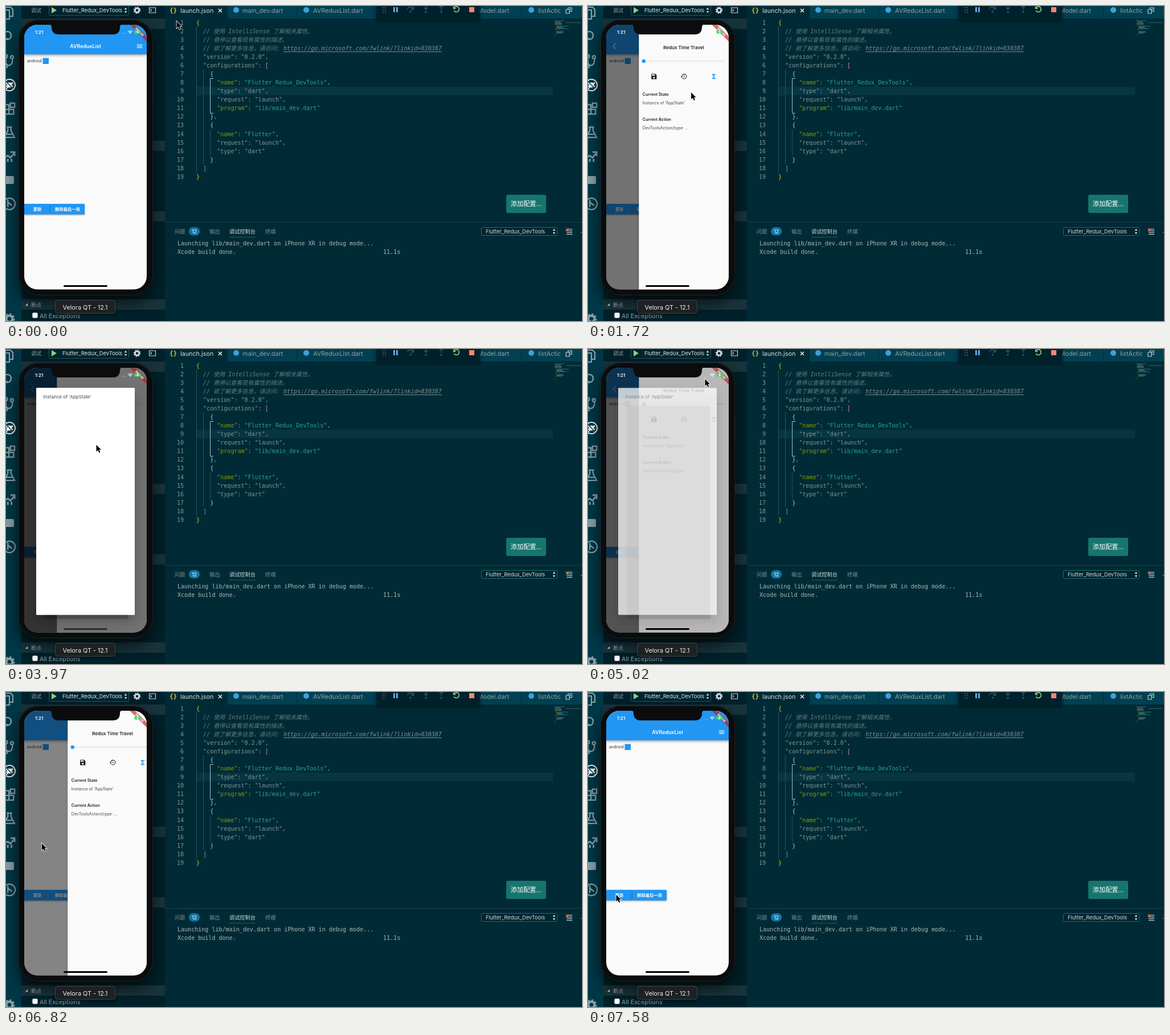
These frames come from a looping animation (1011 by 554 pixels, 8000 ms). An HTML page with a canvas:

```html
<!DOCTYPE html>
<html lang="zh">
<head>
<meta charset="utf-8">
<title>Redux DevTools</title>
<style>
  html, body { margin: 0; width: 100%; height: 100%; overflow: hidden; background: #002b36; }
  canvas { display: block; }
</style>
</head>
<body>
<canvas id="stage" width="1011" height="554"></canvas>
<script>
const c = document.getElementById('stage').getContext('2d');
const UI = 'Inter, "Noto Sans CJK SC", sans-serif';
const MONO = '"DejaVu Sans Mono", "Noto Sans CJK SC", monospace';
const GREY = '#839496', BLUE = '#2196f3', TEAL = '#2aa198', GREEN = '#859900', NOTE = '#657b83';

// ---- helpers ----
function box(x, y, w, h, fill, r = 0, stroke) {
  c.beginPath();
  c.roundRect(x, y, w, h, r);
  if (fill) { c.fillStyle = fill; c.fill(); }
  if (stroke) { c.strokeStyle = stroke; c.lineWidth = 1; c.stroke(); }
}
function dot(x, y, r, fill) {
  c.beginPath();
  c.arc(x, y, r, 0, 7);
  c.fillStyle = fill;
  c.fill();
}
function text(s, x, y, size, fill, style = '', align = 'left', family = UI) {
  c.font = `${style} ${size}px ${family}`;
  c.textAlign = align;
  c.fillStyle = fill;
  c.fillText(s, x, y + size * 0.36);
  return c.measureText(s).width;
}
const mono = (s, x, y, fill, style) => text(s, x, y, 10.04, fill, style, 'left', MONO);

// Paths live on a 24-unit grid centred on (x, y).
function icon(d, x, y, color, size = 12.5, line = 0) {
  c.save();
  c.translate(x - size / 2, y - size / 2);
  c.scale(size / 24, size / 24);
  const p = new Path2D(d);
  c.fillStyle = c.strokeStyle = color;
  c.lineWidth = line;
  line ? c.stroke(p) : c.fill(p, 'evenodd');
  c.restore();
}
function gear(x, y, r, color) {
  c.strokeStyle = color;
  for (const [radius, width, dash] of [[r * .6, r * .45, []], [r * .9, r * .3, [r * .35, r * .357]]]) {
    c.beginPath();
    c.arc(x, y, radius, 0, 2 * Math.PI);
    c.lineWidth = width;
    c.setLineDash(dash);
    c.stroke();
  }
  c.setLineDash([]);
}
function shadow(blur, dy, alpha, draw) {
  c.save();
  c.shadowColor = `rgba(0,0,0,${alpha})`;
  c.shadowBlur = blur;
  c.shadowOffsetY = dy;
  draw();
  c.restore();
}
const updown = (x, y) => icon('M12 1l5 8H7zM12 23l5-8H7z', x, y, '#d5dcdd', 11);

const GLYPH = {
  save: 'M17 3H5a2 2 0 0 0-2 2v14a2 2 0 0 0 2 2h14a2 2 0 0 0 2-2V7zM12 19a3 3 0 1 1 0-6 3 3 0 0 1 0 6zM15 9H5V5h10z',
  history: 'M13 3a9 9 0 0 0-9 9H1l4 4 4-4H6a7 7 0 1 1 2 5l-1.4 1.4A9 9 0 1 0 13 3zM12 8v5l4.3 2.5.7-1.2-3.5-2.1V8z',
  sigma: 'M18 4H6v2l6.5 6L6 18v2h12v-3h-7l5-5-5-5h7z',
  menu: 'M3 18h18v-2H3zM3 13h18v-2H3zM3 8h18V6H3z',
  back: 'M17 2.5L15.2.8 4 12l11.2 11.2 1.8-1.8L7.6 12z',
  wifi: 'M1 9l2 2a12.7 12.7 0 0 1 18 0l2-2A15.6 15.6 0 0 0 1 9zm8 8l3 3 3-3a4.2 4.2 0 0 0-6 0zm-4-4l2 2a7 7 0 0 1 10 0l2-2a9.9 9.9 0 0 0-14 0z'
};

// ---- editor window ----
const pair = (key, value, end = ',') => [6, `"${key}"`, GREEN, ': ', GREY, `"${value}"`, TEAL, end, GREY];
const plain = (indent, s) => [indent, s, GREY];
const CODE = [
  [0, '{', '#e8c800'],
  [2, '// 使用 IntelliSense 了解相关属性。', NOTE],
  [2, '// 悬停以查看现有属性的描述。', NOTE],
  [2, '// 欲了解更多信息，请访问: ', NOTE],
  plain(2, '"version": "0.2.0",'),
  [2, '"configurations": ', GREY, '[', '#da70d6'],
  [4, '{', '#87cefa'],
  pair('name', 'Flutter_Redux_DevTools'),
  plain(6, '"type": "dart",'),
  plain(6, '"request": "launch",'),
  pair('program', 'lib/main_dev.dart', ''),
  [4, '}', '#87cefa', ',', GREY],
  [4, '{', '#87cefa'],
  pair('name', 'Flutter'),
  plain(6, '"request": "launch",'),
  plain(6, '"type": "dart"'),
  [4, '}', '#87cefa'],
  plain(2, ']'),
  [0, '}', '#e8c800']
];

function drawCode() {
  box(334, 142, 626, 15, '#073642');
  for (const [x, y, h] of [[334, 36, 257], [346, 111, 167], [358, 217, 46]]) box(x, y, 1, h, '#2b535c');
  c.strokeStyle = '#9cc3cc';
  c.lineWidth = 1;
  c.stroke(new Path2D('M364 127.5H358.5V188.5H364'));
  CODE.forEach(([indent, ...parts], i) => {
    const y = 29 + i * 15.07;
    text(i + 1, 312, y, 10.04, GREY, '', 'right', MONO);
    let x = 334 + indent * 6.04, mapX = 962 + indent * .7;
    for (let k = 0; k < parts.length; k += 2) {
      const [s, color] = parts.slice(k, k + 2);
      x += mono(s, x, y, color, color === NOTE ? 'italic' : '');
      c.globalAlpha = .7;
      box(mapX, 24 + i * 1.55, s.length * .65, 1, color);
      c.globalAlpha = 1;
      mapX += s.length * .65;
    }
  });
  const w = mono('https://go.microsoft.com/fwlink/?linkid=830387', 487, 74.2, '#7b8f93', 'italic');
  box(487, 80, w, 1, '#7b8f93');
  box(983, 28.6, 26, 1, '#456068');
}

function drawTabs() {
  box(279, 0, 732, 22, '#004052');
  box(279, 0, 109, 22, '#002b36');
  for (const x of [388, 510, 650, 904]) box(x, 0, 1, 22, '#002b36');
  text('{}', 287, 7, 11, '#d6c630', 'bold', 'left', MONO);
  text('launch.json', 306, 8, 10.8, '#d6dfe0');
  icon('M4 4L20 20M20 4L4 20', 376, 8, '#e8eeee', 9, 4);
  for (const x of [404, 527, 922]) dot(x, 7, 5, '#3fa0d8');
  const tab = '#93a1a1';
  text('main_dev.dart', 415, 8, 10.8, tab);
  text('AVReduxList.dart', 539, 8, 10.8, tab);
  text('listModel.dart', 883, 8, 10.8, tab, '', 'right');
  text('listAction.dart', 934, 8, 10.8, tab);
  box(973, 0, 38, 22, '#004052');
  icon('M2 8H14V22H2ZM9 8V2H22V15H14M13 11L18 6', 988, 8, '#c5d0d2', 12, 2.4);
  icon('M2 2H22V22H2ZM12 2V22', 1016, 8, '#c5d0d2', 11, 2.4);

  shadow(6, 1, .6, () => box(650, -6, 182, 31, '#00212b'));
  for (const x of [661, 665]) for (const y of [2, 6, 10]) box(x, y, 1.6, 1.6, '#63777c');
  box(680, 2, 2.5, 9, '#75beff');
  box(685, 2, 2.5, 9, '#75beff');
  const dim = '#245a7a';
  icon('M2 11A10 9 0 0 1 21 10M22 2V11H13', 710, 6, dim, 13, 2.6);
  dot(710, 10, 1.7, dim);
  icon('M12 0V13M6 8L12 14L18 8', 737, 5, dim, 13, 2.6);
  dot(737, 10.5, 1.7, dim);
  icon('M12 15V2M6 7L12 1L18 7', 764, 5, dim, 13, 2.6);
  dot(764, 10.5, 1.7, dim);
  icon('M4 3V10H11M4 10A9 9 0 1 1 5 17', 790, 5.5, '#89d185', 13, 3);
  box(813, 2, 9, 9, '#f48771');
}

function drawPanel() {
  box(878, 332, 70, 32, '#17756f', 3);
  text('添加配置...', 913, 348, 11.2, '#fff', '', 'center');
  box(279, 380, 732, 1, '#233a52');
  text('问题', 296, 396.5, 9.2, '#7d9094');
  box(321, 389, 19, 14.5, '#0e78a5', 7);
  text('12', 330.5, 396.5, 9, '#fff', '', 'center');
  text('输出', 357, 396.5, 9.2, '#7d9094');
  text('调试控制台', 392, 396.5, 9.2, '#d5dcdd');
  text('终端', 455, 396.5, 9.2, '#7d9094');
  box(392, 406, 46, 1, '#2b5a64');
  box(834.5, 389.5, 133, 14, '#00252f', 2, '#1f6d70');
  text('Flutter_Redux_DevTools', 842, 396.5, 9.2, '#d5dcdd');
  updown(962, 396.5);
  for (const y of [392, 395, 398, 401]) box(984, y, 10, 1.2, '#c5d0d2');
  icon('M3 3L21 21M21 3L3 21', 985, 393.5, '#f0694f', 6, 5);
  icon('M4 18L12 10L20 18', 1012, 397, '#c5d0d2', 8, 3);
  mono('Launching lib/main_dev.dart on iPhone XR in debug mode...', 301, 417.5, '#a9b7b8');
  mono('Xcode build done.', 301, 432.5, '#a9b7b8');
  mono('11.1s', 662, 432.5, '#a9b7b8');
}

function drawSidebar() {
  box(0, 0, 27, 554, '#003847');
  box(27, 0, 252, 554, '#00212b');
  for (const y of [22, 237, 361, 516]) box(27, y, 252, 18, '#1a343c');
  const idle = '#86a0a6';
  icon('M0 7H12V23H0M5 7V2H14L18 6V18H12', 6, 12, idle, 24, 2.2);
  icon('M9 16A7 7 0 1 1 15 11A7 7 0 0 1 3 15L-6 23', 6, 54, idle, 22, 2.6);
  icon('M5 3V21M17 6A6 8 0 0 1 5 16M8 22A3 3 0 1 1 2 22A3 3 0 1 1 8 22M8 2A3 3 0 1 1 2 2A3 3 0 1 1 8 2M20 4A3 3 0 1 1 14 4A3 3 0 1 1 20 4', 6, 97, idle, 21, 2.4);
  icon('M23 12A11 11 0 1 1 1 12A11 11 0 1 1 23 12M4 4L20 20M5 9H19M5 14H19M6 19L18 7', 6, 139, '#fff', 22, 2);
  dot(6, 139, 4.5, '#fff');
  icon('M5 5L19 19', 6, 139, '#003847', 22, 1.5);
  icon('M2 4H11V13H2ZM2 13H11V22H2ZM11 13H20V22H11ZM14 1H22V9H14Z', 6, 181, idle, 22, 2.6);
  icon('M7 2H17M9 2V9L2 22H22L15 9V2M5 16H19', 6, 222, idle, 22, 2.4);
  icon('M2 22V14L9 10L14 14L22 4M14 3H22V11M9 22V16M16 22V16', 6, 265, idle, 22, 3);
  box(-6, 299, 20, 14, idle, 2);
  icon('M23 12A11 11 0 1 1 1 12A11 11 0 1 1 23 12M9 4V18M9 9L17 15', 6, 348, idle, 22, 2.4);
  gear(6, 550, 9, idle);

  text('调试', 44, 8, 9, '#93a1a1');
  box(75.5, -4.5, 140, 21, '#00252f', 2, '#2d5560');
  icon('M4 1L22 12L4 23Z', 84, 7.5, '#89d185', 12);
  text('Flutter_Redux_DevTools', 99, 8, 9.3, '#e2e8e8');
  updown(210, 7.5);
  gear(230, 7.5, 6, '#d5dcdd');
  icon('M1 3H23V21H1ZM5 8L9 12L5 16', 257, 7.5, '#d5dcdd', 12, 2.2);
  icon('M18 6V18H6Z', 36, 525, '#c5d0d2', 9);
  text('断点', 44, 525.5, 9, '#a9b7b8');
  box(46.5, 539.5, 9, 9, '#fff', 2, '#aaa');
  text('All Exceptions', 59, 545, 10.8, '#93a1a1');
}

// ---- phone ----
function drawHome(open, menuOpen) {
  box(32, 33, 215, 466, '#fafafa');
  shadow(4, 2, .35, () => box(32, 33, 215, 52, BLUE));
  text('AVReduxList', 139.5, 70.5, 8.9, '#fff', '600', 'center');
  if (menuOpen) icon(GLYPH.back, 47, 70.5, '#fff', 11);
  icon(GLYPH.menu, 234.5, 70.5, '#fff');
  text('android', 37, 96.5, 7.2, '#333');
  box(64.5, 91.5, 10.5, 10.5, BLUE);
  shadow(3, 1, .4, () => {
    box(30, 348, 48, 18.5, BLUE, 1);
    box(78, 348, 60, 18.5, BLUE, 1);
  });
  text('更新', 55, 357, 7.3, '#fff', '600', 'center');
  text('删除最后一项', 108, 357, 7.3, '#fff', '600', 'center');
  if (open) box(32, 33, 215, 466, `rgba(0,0,0,${.54 * open})`);
}

function drawDrawer(open) {
  const x = 247 - 157.7 * open;
  shadow(4, 0, .2, () => box(x, 33, 158, 466, '#fafafa'));
  text('Redux Time Travel', x + 78.7, 73.5, 8.04, '#222', '600', 'center');
  box(x + 8.5, 96.4, 141, 1.2, '#bfdffb');
  dot(x + 8.5, 97, 3.2, BLUE);
  icon(GLYPH.save, x + 26.5, 124, '#222');
  icon(GLYPH.history, x + 79, 124, '#222');
  icon(GLYPH.sigma, x + 131.5, 124, BLUE);
  text('Current State', x + 6.5, 155, 7.1, '#222', '600');
  text("Instance of 'AppState'", x + 6.5, 170, 7.15, '#444');
  text('Current Action', x + 6.5, 199, 7.1, '#222', '600');
  text('DevToolsAction{type: ...', x + 6.5, 214, 7.15, '#444');
}

function drawDialog(alpha) {
  c.globalAlpha = alpha;
  box(32, 33, 215, 466, 'rgba(0,0,0,.54)');
  shadow(20, 10, .25, () => box(53, 68.5, 173, 399, '#fff', 1));
  box(68.5, 100, 146.5, 375, 'rgba(0,0,0,.2)', 1);
  box(53, 68.5, 173, 399, '#fff', 1);
  text("Instance of 'AppState'", 65.5, 84, 8.1, '#444');
  c.globalAlpha = 1;
}

function drawStatus(dimmed) {
  c.save();
  c.translate(247, 33);
  c.rotate(Math.PI / 4);
  box(-21, 14.6, 42, 6.3, 'rgba(183,28,28,.63)');
  text('DEBUG', 0, 17.8, 5.4, '#fff', '800', 'center');
  c.restore();
  text('1:21', 51, 46, 8, '#fff', '600');
  for (let i = 0; i < 4; i++) dot(203.5 + i * 2.4, 48, .6, 'rgba(255,255,255,.6)');
  icon(GLYPH.wifi, 218, 46, '#fff', 9.5);
  box(225.5, 43, 11, 5.5, '#4cd964', 1.2);
  icon('M14 0L5 13H11L9 24L19 9H13Z', 231, 45.8, '#fff', 7);
  box(101, 491, 77, 3, dimmed ? '#2c2c2c' : '#000', 1.5);
}

function drawPhone(open, menuOpen, dialog) {
  for (const [x, y, h] of [[20.5, 92, 14], [20.5, 124, 26], [20.5, 158, 26], [257, 117, 52]]) box(x, y, 2.5, h, '#1d2224', 1);
  shadow(28, 12, .65, () => box(22, 24, 236, 485, '#0b0c0d', 35));
  box(22.5, 24.5, 235, 484, null, 35, '#202425');
  c.save();
  c.beginPath();
  c.roundRect(32, 33, 215, 465.5, 23);
  c.clip();
  drawHome(open, menuOpen);
  if (open) drawDrawer(open);
  if (dialog) drawDialog(dialog);
  drawStatus(dialog === 1);
  c.fillStyle = '#0b0c0d';
  c.fill(new Path2D('M76 32Q80 33 80 37Q80 50 93 50H187Q200 50 200 37Q200 33 204 32Z'));
  c.restore();
  shadow(5, 2, .5, () => box(86, 517, 106, 24, '#1d2123', 4));
  box(86.5, 517.5, 105, 23, null, 4, '#3d4547');
  text('Velora QT - 12.1', 139, 530, 10.8, '#f0f0f0', '', 'center');
}

function drawCursor(x, y) {
  c.save();
  c.translate(x, y);
  const arrow = new Path2D('M.5 0V12L3.4 9.4 5.3 14 7.3 13.1 5.4 8.8H9Z');
  c.strokeStyle = '#fff';
  c.lineWidth = 1.6;
  c.stroke(arrow);
  c.fillStyle = '#000';
  c.fill(arrow);
  c.restore();
}

// ---- timing ----
// The screen refreshes in steps: [start, step length].
const CLOCK = [[0, 140], [140, 175], [490, 150], [940, 180], [1120, 150], [6970, 180], [7150, 150], [7580, 420]];
const POINTER = [
  [0, 299, 27], [140, 288, 36], [315, 230, 64], [490, 233, 69], [1120, 233, 69],
  [1720, 180.5, 152], [1870, 164, 175], [2020, 142, 199], [2320, 204, 128],
  [2620, 162, 162], [2770, 157, 168], [3070, 158, 168.5], [4120, 158, 168.5],
  [4720, 205, 53], [5170, 205, 53], [5770, 126.5, 227], [6070, 131, 234],
  [6520, 64, 208], [6670, 64, 208], [6970, 60.5, 324.5], [7580, 49, 356.5]
];
const DRAWER = [[790, 0], [940, .815], [1120, 1], [6670, 1], [6820, .88], [6970, .25], [7150, 0]];
const DIALOG = [[3820, 0], [3970, 1], [4870, 1], [5020, .5], [5170, 0]];

function held(t) {
  const [start, step] = CLOCK.findLast(([s]) => s <= t);
  return start + Math.floor((t - start) / step) * step;
}
function track(keys, t) {
  const i = keys.findIndex(([time]) => time > t);
  if (i < 0) return keys.at(-1).slice(1);
  if (!i) return keys[0].slice(1);
  const [t0, ...a] = keys[i - 1], [t1, ...b] = keys[i];
  return a.map((v, k) => v + (b[k] - v) * (t - t0) / (t1 - t0));
}

let shown = -1;
function frame(now) {
  const t = held(now % 8000);
  if (t !== shown) {
    shown = t;
    const [open] = track(DRAWER, t), [dialog] = track(DIALOG, t);
    box(0, 0, 1011, 554, '#002b36');
    drawCode();
    drawTabs();
    drawPanel();
    drawSidebar();
    drawPhone(open, open > 0 && t < 6800, dialog);
    drawCursor(...track(POINTER, t));
  }
  requestAnimationFrame(frame);
}
requestAnimationFrame(frame);
</script>
</body>
</html>
```
